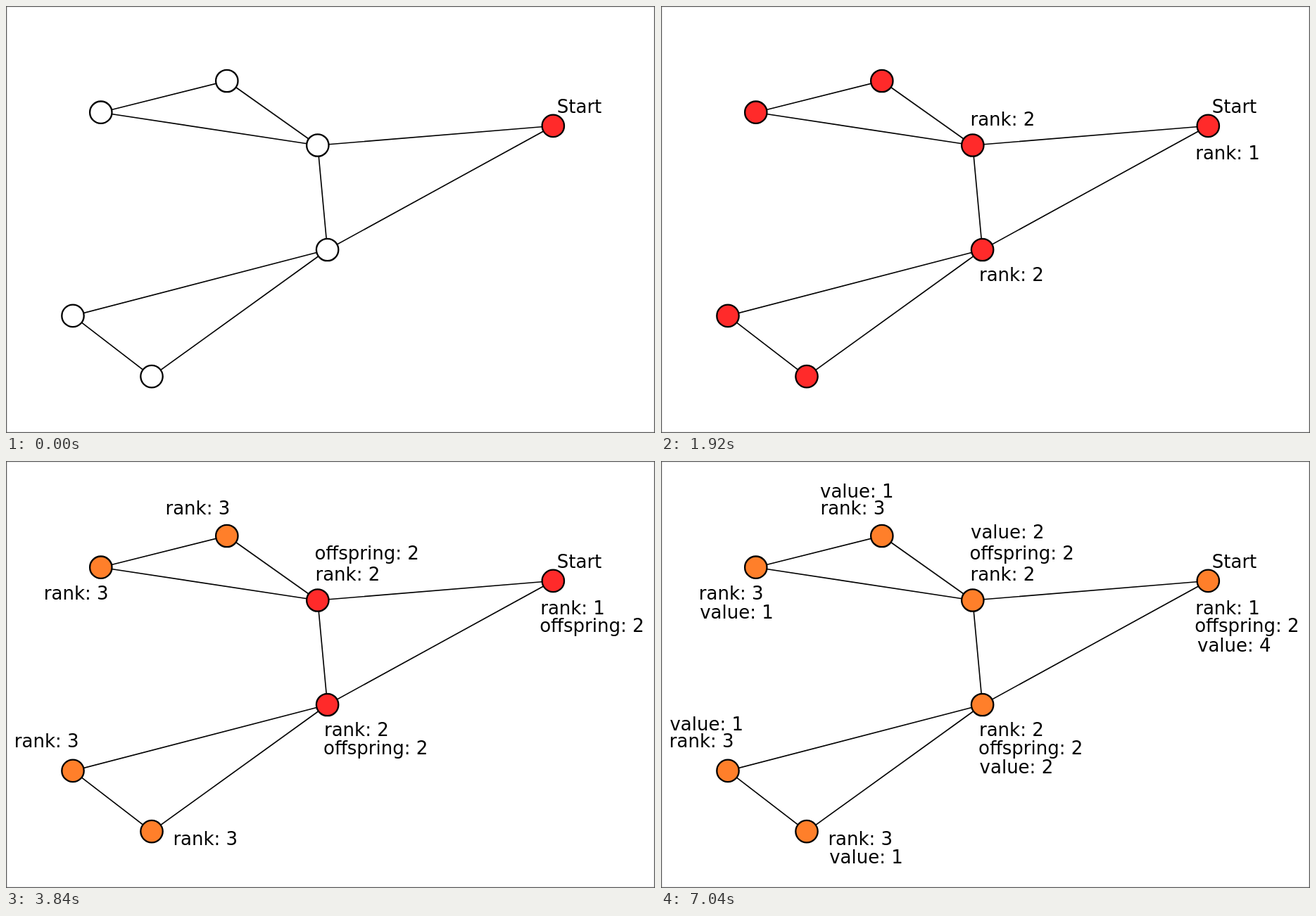
Animation, 922 px wide and 607 px high, one loop 7680 ms. Source, as an HTML page:

```html
<!DOCTYPE html>
<html lang="en">
<head>
<meta charset="utf-8">
<title>Graph ranks</title>
<style>
@property --step { syntax: "<integer>"; inherits: true; initial-value: 0; }
@keyframes run { from { --step: 0; } to { --step: 12; } }
html, body { margin: 0; width: 100%; height: 100%; overflow: hidden; background: #fff; }
svg {
  display: block; width: 922px; height: 607px;
  font: 26px "DejaVu Sans", sans-serif;
  animation: run 7680ms steps(12, end) infinite;
}
/* shown from step --at to the end of the loop */
.on { opacity: clamp(0, var(--step) - var(--at) + 1, 1); }
.red { fill: #ff2a2a; }
.orange { fill: #ff7f2a; }
.edges { fill: none; stroke: #000; stroke-width: 1.65; }
.rings { fill: none; stroke: #000; stroke-width: 2.3; }
.frame { fill: none; stroke: #585858; stroke-width: 1.5; }
</style>
</head>
<body>
<svg viewBox="0 0 922 607">
  <defs>
    <circle id="dot" r="15.7"/>
    <use id="start" href="#dot" x="777.3" y="170.4"/>
    <g id="inner">
      <use href="#dot" x="442.8" y="198"/>
      <use href="#dot" x="456.6" y="346.5"/>
    </g>
    <g id="leaves">
      <use href="#dot" x="134.8" y="151.2"/>
      <use href="#dot" x="313.8" y="106.5"/>
      <use href="#dot" x="95" y="440.4"/>
      <use href="#dot" x="207" y="526.6"/>
    </g>
    <g id="all">
      <use href="#start"/>
      <use href="#inner"/>
      <use href="#leaves"/>
    </g>
  </defs>

  <rect class="frame" x=".5" y=".5" width="921" height="606"/>

  <g class="edges">
    <path d="M442.8 198L313.8 106.5L134.8 151.2Z"/>
    <path d="M442.8 198L777.3 170.4L456.6 346.5Z"/>
    <path d="M456.6 346.5L95 440.4L207 526.6Z"/>
  </g>

  <use href="#all" fill="#fff"/>
  <use href="#start" class="red"/>
  <use href="#inner" class="on red" style="--at:1"/>
  <use href="#leaves" class="on red" style="--at:3"/>
  <use href="#leaves" class="on orange" style="--at:6"/>
  <use href="#inner" class="on orange" style="--at:8"/>
  <use href="#start" class="on orange" style="--at:10"/>
  <use href="#all" class="rings"/>

  <text x="782.8" y="151.5">Start</text>
  <text class="on" style="--at:1" x="759.2" y="217.5">rank: 1</text>
  <g class="on" style="--at:2">
    <text x="439.5" y="169.5">rank: 2</text>
    <text x="452" y="391">rank: 2</text>
  </g>
  <g class="on" style="--at:4">
    <text x="226.5" y="75.7">rank: 3</text>
    <text x="53.8" y="197">rank: 3</text>
    <text x="11.8" y="407.3">rank: 3</text>
    <text x="237.4" y="546">rank: 3</text>
  </g>
  <g class="on" style="--at:5">
    <text x="438.4" y="140">offspring: 2</text>
    <text x="451" y="417">offspring: 2</text>
    <text x="758.2" y="243">offspring: 2</text>
  </g>
  <g class="on" style="--at:7">
    <text x="226" y="51.6">value: 1</text>
    <text x="55.2" y="223.5">value: 1</text>
    <text x="12.4" y="382.6">value: 1</text>
    <text x="239.2" y="572">value: 1</text>
  </g>
  <g class="on" style="--at:9">
    <text x="440" y="109.5">value: 2</text>
    <text x="452.6" y="444">value: 2</text>
  </g>
  <text class="on" style="--at:11" x="762" y="270.5">value: 4</text>
</svg>
</body>
</html>
```
